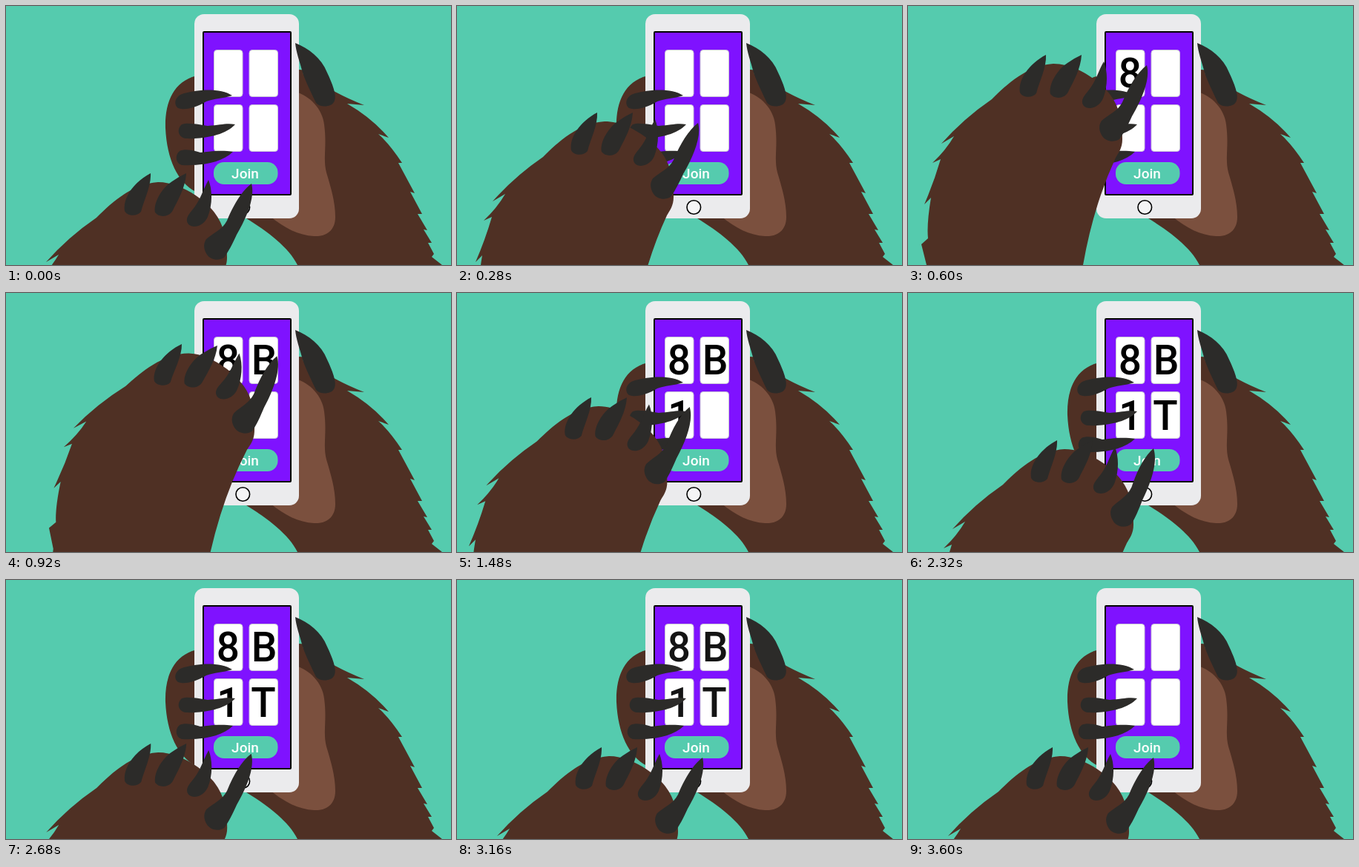
An HTML page for the animation above (3.88 s loop, 600x350 px).

```html
<!DOCTYPE html>
<html lang="en">
<head>
<meta charset="utf-8">
<title>Paws and phone</title>
<style>
  html, body { margin: 0; width: 100%; height: 100%; overflow: hidden; background: #55cbae; }
  svg { display: block; width: 600px; height: 350px; }
  text { font-family: Roboto, Arial, sans-serif; font-weight: 500; text-anchor: middle; }
  .fur { fill: #4f3024; }
  .claw { fill: #2c2b29; }
  .card { fill: #fff; stroke: #c9c4d6; }
  #code text { font-size: 55px; }
</style>
</head>
<body>
<svg viewBox="0 0 600 350">
  <!-- Holding paw, behind the phone -->
  <path class="fur" d="M258 94C226 101 214 130 215 165C217 208 232 240 258 252L324 287C352 304 382 327 393 350
    H588L574 339L577 335L569 320L574 320L563 302L568 303L555 281L561 281L545 251L551 253L529 212L534 212
    Q517 186 502 173L516 178Q493 151 460 132L483 134Q440 117 411 95L400 91L408 87L395 86Z"/>
  <path fill="#7b503e" d="M390 116C410 121 427 140 429 160C433 190 427 205 432 225C438 245 444 265 444 285
    C444 305 430 312 415 311C395 310 375 300 356 284Z"/>

  <rect x="254" y="11" width="141" height="276" rx="13" fill="#ebebed"/>
  <rect x="266" y="35" width="118" height="220" rx="1" fill="#7f12ff" stroke="#000" stroke-width="2"/>
  <circle cx="319.3" cy="272" r="9.3" fill="#fff" fill-opacity=".5" stroke="#000" stroke-width="1.6"/>
  <rect class="card" x="280.5" y="59.5" width="38.5" height="63" rx="4"/>
  <rect class="card" x="328" y="59.5" width="38.5" height="63" rx="4"/>
  <rect class="card" x="280.5" y="133.5" width="38.5" height="63" rx="4"/>
  <rect class="card" x="328" y="133.5" width="38.5" height="63" rx="4"/>
  <rect x="280" y="211" width="86.500" height="30" rx="14" fill="#55cbae"/>
  <text x="322.500" y="233" font-size="19" fill="#fff">Join</text>
  <g id="code">
    <text x="299.500" y="110">8</text>
    <text x="348" y="110">B</text>
    <text x="300" y="185">1</text>
    <text x="347" y="185">T</text>
  </g>

  <!-- Claws around the phone -->
  <g class="claw">
    <path d="M305 121C290 111 262 112 240 118C228 121 225 133 232 138C243 142 258 136 270 129C280 125 293 125 305 121Z"/>
    <path d="M309 160C296 158 290 161 272 162C258 160 245 157 237 160C229 167 233 178 242 179C262 180 295 176 309 160Z"/>
    <path d="M306 197C290 194 270 197 262 198C250 194 240 193 234 196C227 202 229 213 237 215C260 216 290 213 306 197Z"/>
    <path d="M390 50C408 57 425 70 433 90C440 105 446 120 443 128C440 137 424 138 418 131C414 122 405 105 400 90C396 75 391 62 390 50Z"/>
  </g>

  <!-- Tapping paw -->
  <g id="paw">
    <path class="fur" d="M54 346Q84 312 122 286C142 266 170 240 205 238C236 238 268 262 281 279C294 296 298 315 298 340
      C298 352 293 358 289 365Q259 430 245 510L235 570H30L34 510L27 482L36 474Q34 455 40 419L31 428Q44 398 53 367
      L42 372Q60 355 71 336Z"/>
    <g class="claw">
      <path d="M195 226C196 243 186 262 182 278C177 285 163 284 160 277C157 260 172 238 195 226Z"/>
      <path d="M243 226C242 245 232 262 225 276C220 286 206 286 201 279C198 266 211 245 224 237Q234 230 243 226Z"/>
      <path d="M273 235C279 250 278 270 272 285C266 298 252 301 246 295C240 287 248 280 254 272C263 260 266 247 273 235Z"/>
      <path id="thumb" d="M331 240C336 258 325 285 311 309C305 322 300 332 294 340C286 345 276 343 271 336
        C266 328 266 321 270 315C280 306 291 303 298 290C307 268 318 250 331 240Z"/>
    </g>
  </g>
</svg>
<script>
const LOOP = 3880, STEP = 40;
const byId = id => document.getElementById(id);
const paw = byId('paw'), thumb = byId('thumb'), code = byId('code');
const shownAt = [560, 880, 1440, 1880];

// time, x, y, paw angle, thumb angle
const poses = [
  [0, 0, 0, 0, 0],
  [280, -6, -82, 0, 0],
  [520, -12, -155, 0, -2],
  [600, -9, -160, 0, 0],
  [720, 20, -168, 1.5, 0],
  [820, 46, -166, 2.4, 0],
  [920, 42, -157, 2.5, -4.7],
  [1120, 29, -143, 2, 0],
  [1300, 0, -108, 1, 0],
  [1480, -14, -85, .3, -2.2],
  [1680, 8, -88, 1, 0],
  [1880, 42, -88, 2.2, -4],
  [2040, 36, -72, 1.6, 0],
  [2240, 16, -39, .6, -2],
  [2320, 6, -27, 0, -4],
  [2560, 1, -10, 0, -1],
  [2920, 0, 0, 0, 0]
];

// Slope of one channel at a pose; the ends are at rest
function slope(i, k) {
  const a = poses[i - 1], b = poses[i + 1];
  return a && b ? (b[k] - a[k]) / (b[0] - a[0]) : 0;
}

// Cubic Hermite curve through the poses
function channel(k, t) {
  const j = poses.findIndex(p => p[0] > t);
  if (j < 0) return poses[poses.length - 1][k];
  const a = poses[j - 1], b = poses[j], d = b[0] - a[0], u = (t - a[0]) / d, v = 1 - u;
  return v * v * ((1 + 2 * u) * a[k] + u * d * slope(j - 1, k))
       + u * u * ((1 + 2 * v) * b[k] - v * d * slope(j, k));
}

function draw(now) {
  const t = Math.floor(now % LOOP / STEP) * STEP;
  const [x, y, turn, bend] = [1, 2, 3, 4].map(k => channel(k, t));
  paw.setAttribute('transform', `translate(${x} ${y}) rotate(${turn} 195 226)`);
  thumb.setAttribute('transform', `rotate(${bend} 285 325)`);
  [...code.children].forEach((glyph, i) => glyph.setAttribute('visibility', t >= shownAt[i] ? 'visible' : 'hidden'));
  code.setAttribute('opacity', Math.max(0, Math.min(1, (3600 - t) / 480)));
}

let start;
function tick(now) {
  start ??= now;
  draw(now - start);
  requestAnimationFrame(tick);
}
draw(0);
requestAnimationFrame(tick);
</script>
</body>
</html>
```
